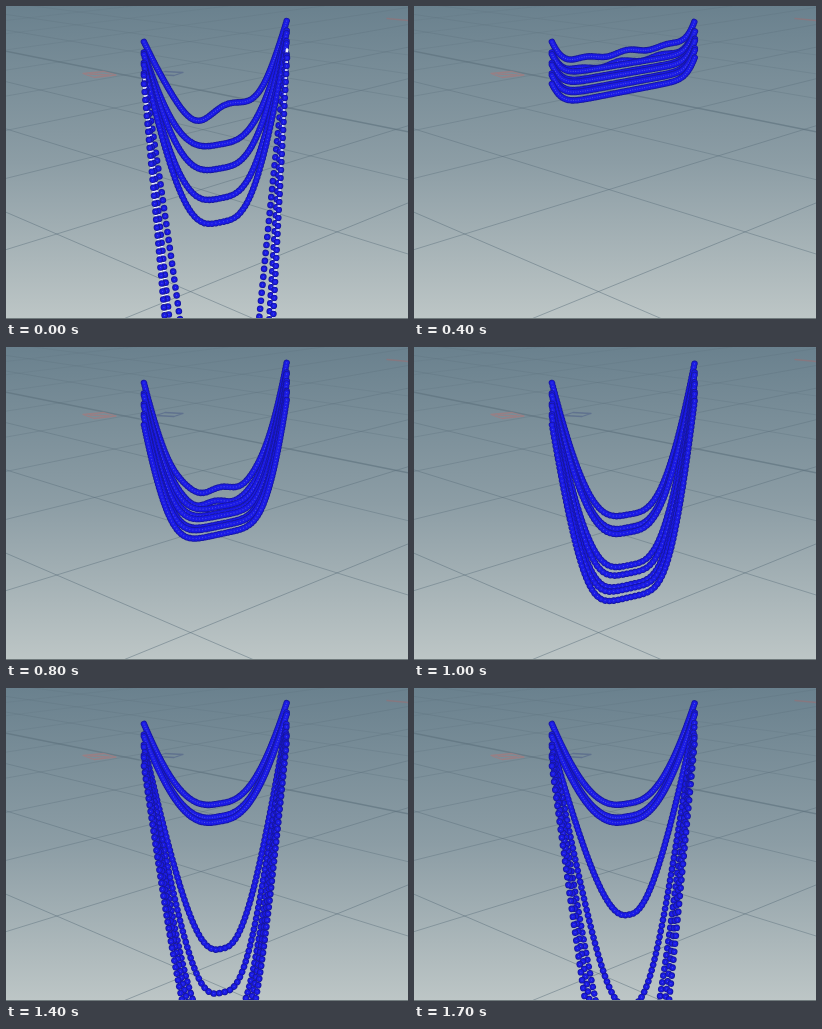
These frames come from a looping animation (402x313 px, 1.8 s). An HTML page:

```html
<!DOCTYPE html>
<html lang="en">
<head>
<meta charset="utf-8">
<title>Falling ropes</title>
<style>
  html, body { margin: 0; width: 100%; height: 100%; overflow: hidden; background: #8c9da5; }
  svg { display: block; width: 100vw; height: 100vh; }
  path { fill: none; stroke-linecap: round; stroke-linejoin: round; }
</style>
</head>
<body>
<svg viewBox="0 0 402 313" preserveAspectRatio="none">
  <defs>
    <linearGradient id="sky" x1="0" y1="0" x2="0" y2="1">
      <stop offset="0" stop-color="#6a818e"/>
      <stop offset=".5" stop-color="#8c9da5"/>
      <stop offset="1" stop-color="#bdc6c6"/>
    </linearGradient>
  </defs>
  <rect width="402" height="313" fill="url(#sky)"/>
  <g id="grid" stroke="#5c707c"></g>
  <g stroke-width="1.3">
    <path d="M77 67.5L98 65.5L110 69L88 71.5ZM84 68L103 69" stroke="#a07c80" opacity=".8"/>
    <path d="M150 68.5L159 65.5L177 66.5L168 69.5Z" stroke="#5a6c8c" opacity=".8"/>
    <path d="M381 12.5L402 14.5" stroke="#8d747b" opacity=".8"/>
  </g>
  <g id="ropes"></g>
  <path d="M0 312.5H402" stroke="#707a7c"/>
</svg>
<script>
const STEP = 100, STEPS = 18, ROPES = 8, SAMPLES = 80;
const LANDED = 6;    // step at which free fall turns into stretching
const SLACK = 59;    // sag reached by then

const make = (parent, tag, attrs) => {
  const el = document.createElementNS('http://www.w3.org/2000/svg', tag);
  for (const name in attrs) el.setAttribute(name, attrs[name]);
  return parent.appendChild(el);
};
const mix = (a, b, t) => a + (b - a) * t;

// Floor lines share a vanishing point; their depths are evenly spaced.
const grid = document.getElementById('grid');
function fan(vx, vy, near, gap, count, axis) {
  for (let i = 0; i < count; i++) {
    const y0 = vy + 1 / (near + gap * i);
    make(grid, 'line', {
      x1: 0, y1: y0, x2: 402, y2: mix(y0, vy, 402 / vx),
      'stroke-width': i === axis ? 1.4 : 0.9,
      opacity: i === axis ? 0.6 : Math.max(0.2, 0.55 - i * 0.05)
    });
  }
}
fan(-700, -95, 0.00332, 0.00127, 7, 3);
fan(1180, -120, 0.00208, 0.00067, 9, -1);

// Three stiff ropes on top, then ever softer ones; two ropes share a row.
const ropes = Array.from({ length: ROPES }, (_, i) => {
  const row = Math.ceil(i / 2), twin = i && i % 2 === 0 ? 2 : 0;
  const stiff = i < 3;
  return {
    i, stiff,
    left: 36 + 10.5 * row + twin,
    right: 14 + 9.2 * row + twin,
    reach: stiff ? 4.1 : 7.7 * 1.35 ** (i - 3),
    point: stiff ? 2.3 : 1.6
  };
});

function sag({ i, stiff, reach }, k) {
  if (k === 0) return i < 5 ? 82 + 22 * i : 500 * 2.5 ** (i - 5);
  if (k <= LANDED) return SLACK * ((k - 1) / (LANDED - 1)) ** 2;
  const swing = SLACK + 20.5 * reach * Math.sin(Math.PI / 2 * (k - LANDED) / reach);
  return stiff ? Math.max(swing, 91) + 3 * i : swing;
}

// Exponent of the curve: high is a flat bottom, low is a pointed one.
function bend({ i, reach, point }, k) {
  if (k === 0) return i < 5 ? 2.8 : 2;
  if (k <= LANDED) return 5 + 2 * (LANDED - k);
  return mix(point, 5, Math.exp((LANDED - k) / (0.6 * reach)));
}

function ripple({ i }, k, u) {
  const hold = Math.sqrt(Math.max(0, Math.sin(Math.PI * u)));
  if (k === 0 && i === 0) return 7.5 * hold * Math.cos(2 * Math.PI * (u - 0.33) / 0.54);
  if (k < 2 || k > 9 || i > 1) return 0;
  return 1.8 * hold * Math.sin(2 * Math.PI * u / 0.3 + i);
}

function trace(rope, k) {
  const depth = sag(rope, k), power = bend(rope, k), centre = 0.52, soft = 0.06;
  let d = '';
  for (let n = 0; n <= SAMPLES; n++) {
    const u = n / SAMPLES;
    const off = (u - centre) / (u < centre ? centre : 1 - centre);
    const side = (Math.hypot(off, soft) - soft) / (Math.hypot(1, soft) - soft);
    const drop = depth * (1 - side ** power) + ripple(rope, k, u);
    // Seen from above, verticals lean inwards as they go down.
    const x = mix(138 + 0.08 * drop, 281 - 0.045 * drop, u);
    const y = mix(rope.left, rope.right, u) + drop;
    d += (n ? 'L' : 'M') + x.toFixed(2) + ' ' + y.toFixed(2);
  }
  return d;
}

const layer = document.getElementById('ropes');
for (const rope of ropes) {
  const line = (stroke, width, opacity) =>
    make(layer, 'path', { stroke, 'stroke-width': width, opacity });
  rope.thread = line('#eef0ff', 2.6, 1);
  rope.beads = [line('#1616a2', 6.6, 1), line('#1a1ae6', 4.8, 1), line('#8088dc', 1.2, 0.5)];
}

function draw(k) {
  for (const rope of ropes) {
    const d = trace(rope, k);
    rope.thread.setAttribute('d', d);
    rope.thread.style.display = k === 0 && rope.i > 5 ? '' : 'none';
    const gap = Math.min(8, Math.max(2.4, rope.thread.getTotalLength() / 100));
    for (const path of rope.beads) {
      path.setAttribute('d', d);
      path.setAttribute('stroke-dasharray', '0.01 ' + gap.toFixed(2));
    }
  }
}

let shown = -1;
const start = performance.now();
function tick() {
  const k = Math.floor((performance.now() - start) / STEP) % STEPS;
  if (k !== shown) draw(shown = k);
  requestAnimationFrame(tick);
}
tick();
</script>
</body>
</html>
```
